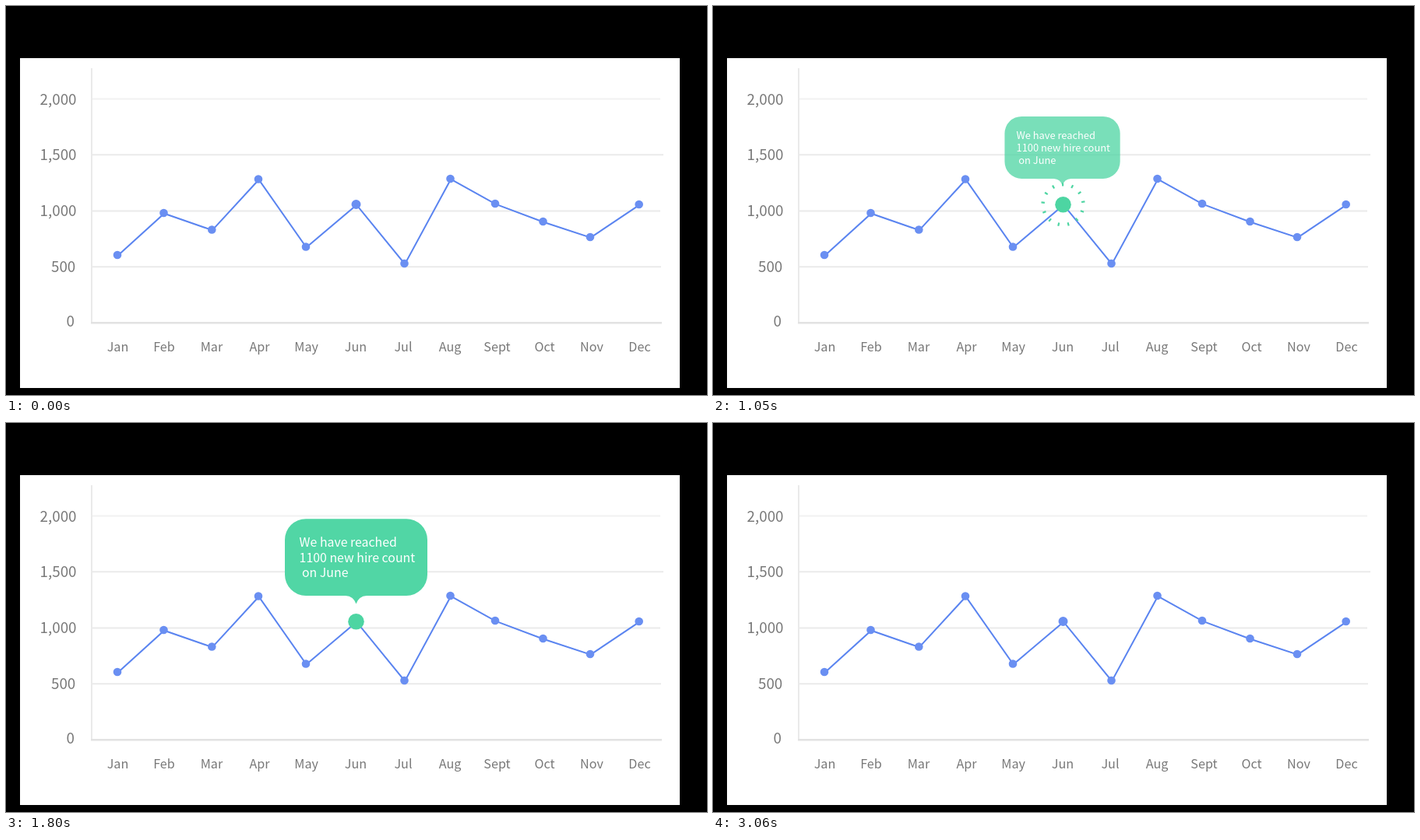
Write an HTML page that moves like this. It is 900 px wide and 500 px high and loops after 3180 ms.

```html
<!DOCTYPE html>
<html lang="en">
<head>
<meta charset="utf-8">
<title>Monthly hires</title>
<style>
  html, body { margin: 0; width: 100%; height: 100%; overflow: hidden; background: #000; }
  svg { display: block; }
  text { font-family: "Noto Sans CJK JP", "Noto Sans CJK SC", "Noto Sans CJK", "Open Sans", sans-serif; }
  #values { font-size: 18.8px; font-weight: 300; fill: #787878; text-anchor: end; }
  #months { font-size: 16.2px; font-weight: 300; fill: #787878; text-anchor: middle; }
  #bubble text { font-size: 15.9px; fill: #fff; }
</style>
</head>
<body>
<svg width="900" height="500" viewBox="0 0 900 500">
  <rect width="900" height="500"/>
  <rect x="18" y="67" width="847" height="424" fill="#fff"/>
  <g fill="none" stroke="#eaeaea" stroke-width="2">
    <path d="M110 119.5H840" stroke="#f1f1f1"/>
    <path d="M110 80V408M110 191.3H844M110 263.5H840M110 335.2H841"/>
    <path d="M109 407.2H842" stroke="#e2e2e2" stroke-width="2.5"/>
  </g>
  <g id="values"></g>
  <g id="months"></g>
  <polyline id="line" fill="none" stroke="#5a84f0" stroke-width="2" transform="translate(.6 .7)"/>
  <g id="points" fill="#6a8ff2"></g>
  <circle id="ring" cx="449.5" cy="255.3" r="17.6" pathLength="360" fill="none"
    stroke="#4dd5a2" stroke-width="2" transform="rotate(-90 449.5 255.3)"/>
  <path id="burst" fill="none" stroke="#4dd5a2" stroke-width="2.2"/>
  <g id="bubble">
    <path fill="#51d6a5" d="M385 123.2H514a27 27 0 0 1 27 27V195a27 27 0 0 1-27 27H463
      Q453 222.5 449.5 232.5Q446 222.5 436 222H385a27 27 0 0 1-27-27V150.2a27 27 0 0 1 27-27Z"/>
    <text x="376.6" y="159.5">We have reached</text>
    <text x="376.6" y="179">1100 new hire count</text>
    <text x="380" y="198.5">on June</text>
  </g>
  <circle id="dot" cx="449.5" cy="255.3" fill="#4dd5a2"/>
</svg>
<script>
const LOOP = 3180, STEP = 30, CX = 449.5, CY = 255.3, DOT_R = 10.3;
const $ = id => document.getElementById(id);
const [line, ring, burst, bubble, dot] = ["line", "ring", "burst", "bubble", "dot"].map($);

function add(parent, tag, attrs, text = "") {
  const el = document.createElementNS("http://www.w3.org/2000/svg", tag);
  for (const key in attrs) el.setAttribute(key, attrs[key]);
  el.textContent = text;
  $(parent).append(el);
}

// Static chart
[["2,000", 90.5, 127], ["1,500", 90.5, 198], ["1,000", 90.5, 270], ["500", 89.3, 341.5], ["0", 88, 412]]
  .forEach(([label, x, y]) => add("values", "text", { x, y }, label));

// Month, label x, point x, point y
const data = [
  ["Jan", 143.5, 143, 320], ["Feb", 203, 202.5, 266], ["Mar", 264, 264.3, 287.5],
  ["Apr", 325.5, 324, 222.5], ["May", 385.7, 385, 309.5], ["Jun", 449, 449.5, 255],
  ["Jul", 510, 511.5, 331], ["Aug", 570, 570.5, 222], ["Sept", 630.5, 628, 254],
  ["Oct", 691.5, 689.5, 277], ["Nov", 752, 750, 297], ["Dec", 813.5, 812.7, 255]
];
data.forEach(([month, labelX, x, y]) => {
  add("months", "text", { x: labelX, y: 444 }, month);
  add("points", "circle", { cx: x, cy: y, r: month === "Jun" ? 6 : 5.3 });
});
line.setAttribute("points", data.map(([, , x, y]) => x + "," + y).join(" "));

// Motion
const progress = (t, from, to) => Math.min(1, Math.max(0, (t - from) / (to - from)));
const easeInOut = p => p < .5 ? 2 * p * p : 1 - 2 * (1 - p) ** 2;

function drawDot(t) {
  const size = easeInOut(progress(t, 400, 760)) - easeInOut(progress(t, 2860, 3060));
  dot.setAttribute("r", DOT_R * size);
}

function drawRing(t) {
  const head = 360 * progress(t, 240, 750);
  const tail = 360 * progress(t, 393, 903);
  ring.setAttribute("stroke-dasharray", `0 ${tail} ${head - tail} 720`);
  ring.style.display = head > tail ? "" : "none";
}

function drawBurst(t) {
  const mid = (t - 830) * .118;
  const half = Math.min(4.4, (1203 - t) * .029) / 2;
  let d = "";
  if (t > 900 && half > 0) {
    for (let i = 0; i < 13; i++) {
      const a = (i * 360 / 13 - 1) * Math.PI / 180;
      const at = r => `${CX + r * Math.sin(a)} ${CY - r * Math.cos(a)}`;
      d += `M${at(mid - half)}L${at(mid + half)}`;
    }
  }
  burst.setAttribute("d", d);
  burst.setAttribute("opacity", 1 - .3 * progress(t, 1050, 1200));
}

function drawBubble(t) {
  const x = Math.max(0, t - 908);
  const out = progress(t, 2400, 2820);
  // Damped spring on entry, slight anticipation on exit
  const spring = 1 - Math.exp(-.0107 * x) * Math.cos(.00146 * x + 1.545e-5 * x * x);
  const scale = Math.max(0, spring - (1.6 * out ** 3 - .6 * out ** 2));
  bubble.setAttribute("transform", `translate(444.5 221.5) scale(${scale}) translate(-444.5 -221.5)`);
  bubble.setAttribute("opacity", progress(t, 908, 1093) * (1 - progress(out, .6, 1)));
}

function frame() {
  const t = Math.floor(performance.now() % LOOP / STEP) * STEP;
  drawDot(t);
  drawRing(t);
  drawBurst(t);
  drawBubble(t);
  requestAnimationFrame(frame);
}
frame();
</script>
</body>
</html>
```
